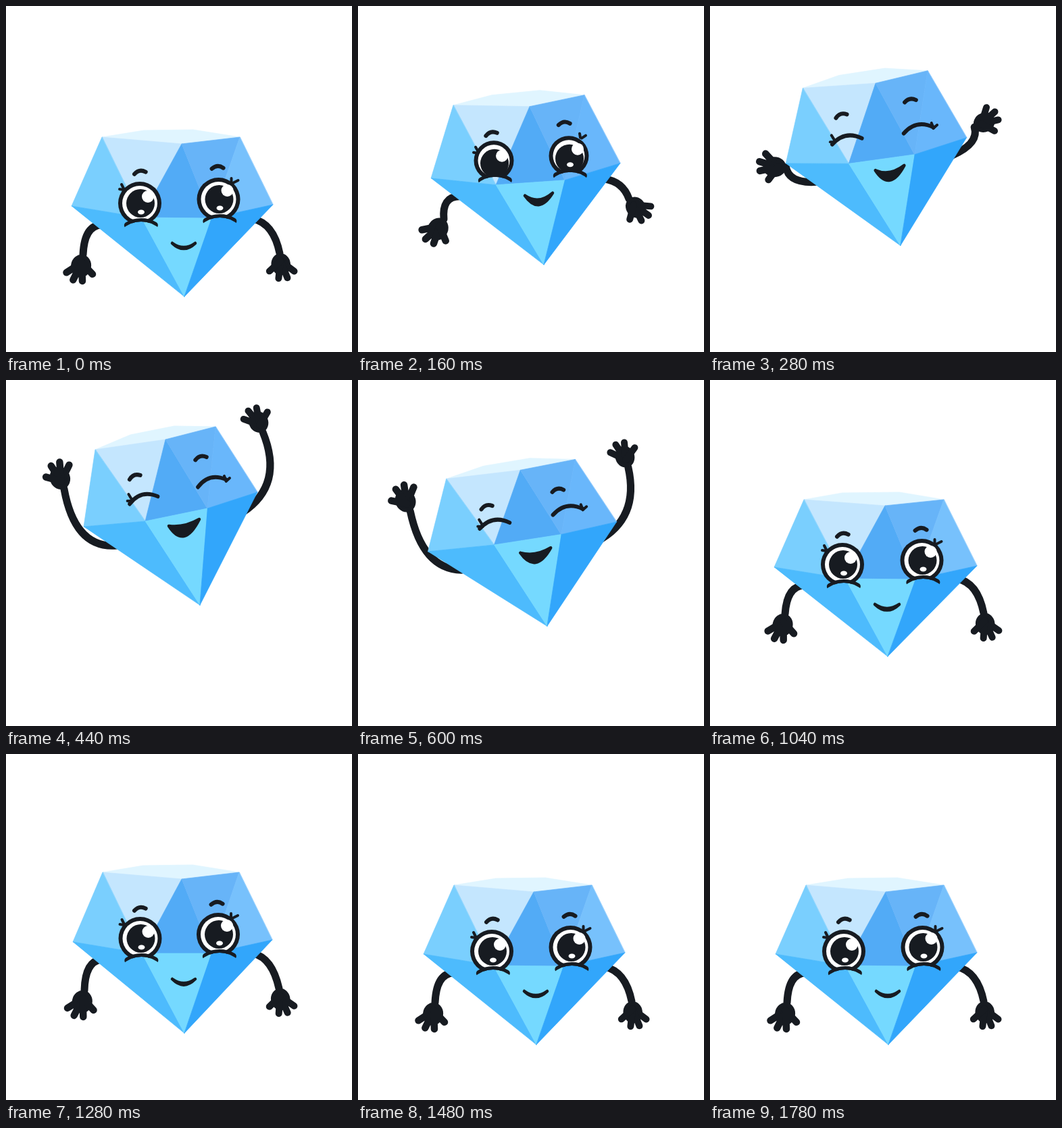
Write an HTML page with a canvas that moves like this. It is 512x512 px and loops after 1800 ms.

```html
<!DOCTYPE html>
<html lang="en">
<head>
<meta charset="utf-8">
<title>Happy gem</title>
<style>
html, body { margin: 0; width: 100%; height: 100%; overflow: hidden; background: #fff; }
canvas { display: block; }
</style>
</head>
<body>
<canvas id="stage" width="512" height="512"></canvas>
<script>
const ctx = document.getElementById('stage').getContext('2d');
const LOOP = 1800, INK = '#171b21', RAD = Math.PI / 180;
const keys = [];

// gem: ten corners; arms: shoulder, bend, wrist, hand angle;
// face: eyes, brows, mouth corners, lip depths, tilt, squint
function key(t, gem, left, right, face, lift = 0) {
  keys.push({ t, v: [...gem, ...left, ...right, ...face, lift] });
}

const rest = [
  [142,194, 204,184, 277,183, 346,194, 260,204, 97,296, 200,313, 304,314, 395,294, 264,430],
  [142,324, 116,324, 114,368, 100],
  [366,315, 396,322, 405,366, 84],
  [198,292, 314.5,286, 198,245, 313,238, 246,351, 280,351, 12,16, -4, 0]
];
const hop = [
  [143,175, 203,165, 276,164, 345,175, 260,185, 99,278, 201,295, 304,295, 394,275, 264,413],
  [142,304, 117,306, 116,350, 101],
  [366,295, 394,302, 404,347, 82],
  [198.5,273, 314,267, 198,228, 312,220, 246,333, 280,333, 12,17, -4, 0]
];

key(0, ...rest);
key(160,
  [141,147, 198,132, 269,125, 335,132, 254,149, 108,255, 204,265, 306,258, 388,233, 275,383],
  [150,282, 124,282, 127,316, 121],
  [364,256, 392,260, 401,286, 52],
  [201,229, 312,222, 197,188, 305,173, 247,281, 288,277, 16,31, -8, 1]);
key(440,
  [132,103, 184,81, 249,68, 310,69, 236,88, 115,217, 206,209, 298,190, 372,166, 287,333],
  [164,245, 102,250, 86,161, 249],
  [350,196, 412,155, 380,77, -113],
  [203,175, 304,150, 190,142, 288,114, 241,216, 286,206, 8,40, -15, 2]);
key(780,
  [130,197, 190,183, 266,178, 340,185, 250,196, 90,297, 196,299, 304,293, 395,278, 268,415],
  [140,324, 92,322, 73,271, 233],
  [360,302, 420,290, 423,244, -90],
  [199,274, 317,263, 190,243, 308,229, 240,325, 284,322, 12,27, -6, 2]);
key(900, rest[0],
  [142,322, 105,328, 93,350, 150],
  [366,313, 404,318, 414,345, 35],
  [197,292, 315,286, 196,246, 312,238, 244,351, 281,350, 12,20, -5, .6]);
key(1040,
  [139,177, 196,167, 280,166, 346,177, 259,186, 95,277, 200,294, 304,295, 395,275, 263,409],
  [140,304, 114,304, 111,346, 102],
  [366,294, 396,300, 405,345, 82],
  [196,273, 313.5,267, 196,228, 312,220, 244,332, 280,332, 12,17, -4, 0]);
key(1160, ...hop, -23);
key(1280, ...hop);
key(1420, ...rest);
key(LOOP, ...rest);

// Monotone slopes: smooth passage without overshoot
const rate = (i, c) => (keys[i + 1].v[c] - keys[i].v[c]) / (keys[i + 1].t - keys[i].t);
keys.forEach((k, i) => {
  k.m = k.v.map((_, c) => {
    if (!i || i === keys.length - 1) return 0;
    const a = rate(i - 1, c), b = rate(i, c);
    return a * b > 0 ? 2 * a * b / (a + b) : 0;
  });
});

function poseAt(t) {
  const i = keys.findIndex(k => k.t > t) - 1;
  const a = keys[i], b = keys[i + 1], d = b.t - a.t, u = (t - a.t) / d;
  const w = u * u * (3 - 2 * u), p = u * (1 - u) * (1 - u) * d, q = u * u * (u - 1) * d;
  return a.v.map((x, c) => x + (b.v[c] - x) * w + a.m[c] * p + b.m[c] * q);
}

function curve(x0, y0, cx, cy, x1, y1, width) {
  ctx.lineWidth = width;
  ctx.beginPath();
  ctx.moveTo(x0, y0);
  ctx.quadraticCurveTo(cx, cy, x1, y1);
  ctx.stroke();
}

function line(x0, y0, x1, y1, width) {
  curve(x0, y0, x0, y0, x1, y1, width);
}

function oval(x, y, rx, ry, color) {
  ctx.fillStyle = color;
  ctx.beginPath();
  ctx.ellipse(x, y, rx, ry, 0, 0, 7);
  ctx.fill();
}

// Draws in a moved, turned and scaled frame
function at(x, y, angle, sx, sy, draw) {
  ctx.save();
  ctx.translate(x, y);
  ctx.rotate(angle * RAD);
  ctx.scale(sx, sy);
  draw();
  ctx.restore();
}

const fingers = [[33, 36], [11.5, 40], [-8.5, 39], [-36, 32]];

function arm([x0, y0, cx, cy, x1, y1, angle], size, side) {
  ctx.strokeStyle = INK;
  curve(x0, y0, cx, cy, x1, y1, 11);
  at(x1, y1, angle, size, size * side, () => {
    oval(17, 0, 17, 15, INK);
    for (const [a, len] of fingers)
      line(12, 0, len * Math.cos(a * RAD), len * Math.sin(a * RAD), 10.5);
  });
}

const facets = [
  ['ABCDE', '#e0f5ff'], ['AEG', '#c4e6fe'], ['AFG', '#7acffe'],
  ['EGH', '#52abf6'], ['EDH', '#67b4f8'], ['DHI', '#77c1fc'],
  ['FGJ', '#4dbbfd'], ['GHJ', '#75d9ff'], ['HIJ', '#32a6fb']
];

function gem(p, squint) {
  ctx.lineWidth = .7;
  for (const [corners, color] of facets) {
    const happy = corners === 'DHI' && squint > 1;
    ctx.fillStyle = ctx.strokeStyle = happy ? '#69b7fb' : color;
    ctx.beginPath();
    for (const c of corners) {
      const i = 2 * (c.charCodeAt(0) - 65);
      ctx.lineTo(p[i], p[i + 1]);
    }
    ctx.closePath();
    ctx.fill();
    ctx.stroke();
  }
}

function openEye(x, y, s, isLeft) {
  const r = 32 - 2.5 * s, cheek = 67 - 3 * s;
  ctx.save();
  ctx.translate(x, y);
  ctx.beginPath();
  ctx.rect(-50, -50, 100, 150);
  ctx.arc(2, cheek, 40, 0, 7);
  ctx.clip('evenodd');
  oval(0, 0, r, r, INK);
  oval(0, 0, r - 6, r - 6, '#fff');
  oval(1, 4 * s, 21, 21, INK);
  oval(isLeft ? 12 : 13, (isLeft ? -10 : -13) + 3 * s, 9, 9, '#fff');
  oval(2, 13, 5, isLeft ? 3.5 * Math.max(0, 1 - s) : 3.5, '#fff');
  ctx.lineWidth = 10;
  ctx.beginPath();
  ctx.arc(2, cheek, 40, -2.1, -1.05);
  ctx.stroke();
  ctx.restore();
  if (isLeft) {
    line(x - 30, y - 21 + 9 * s, x - 24, y - 20 + 9 * s, 4);
    line(x - 27, y - 28 + 8 * s, x - 23, y - 20 + 7 * s, 4);
  } else {
    line(x + 19 - 3 * s, y - 31 - 2 * s, x + 19 - 2 * s, y - 25 - 2 * s, 4);
    line(x + 29 - 4 * s, y - 28 - 2 * s, x + 21 - 2 * s, y - 24 - 2 * s, 4);
  }
}

function closedEye(x, y, tilt, isLeft) {
  const k = 1 + (tilt + 6) / 90;
  at(x, y, tilt, k, 1, () => curve(-24, 3, 0, -14, 24, 3, 6));
  if (isLeft) {
    line(x - 24 * k, y - 6, x - 18 * k, y + 3, 4);
    line(x - 26 * k, y + 4, x - 18 * k, y + 4, 4);
  } else {
    line(x + 21 * k, y - 8, x + 24 * k, y - 1, 4);
    line(x + 30 * k, y - 5, x + 24 * k, y, 4);
  }
}

function face([lx, ly, rx, ry, blx, bly, brx, bry, x0, y0, x1, y1, top, low, tilt, squint]) {
  ctx.strokeStyle = INK;
  for (const [x, y, isLeft] of [[lx, ly, true], [rx, ry, false]]) {
    if (squint > 1.35) closedEye(x, y, tilt, isLeft);
    else openEye(x, y, squint, isLeft);
  }
  const brow = () => curve(-8.5, 2.5, 0, -4.5, 8.5, 2, 6);
  at(blx, bly, tilt - 5, 1, 1, brow);
  at(brx, bry, tilt + 2, 1, 1, brow);

  const mx = (x0 + x1) / 2, my = (y0 + y1) / 2;
  ctx.fillStyle = INK;
  ctx.lineWidth = 4.5;
  ctx.beginPath();
  ctx.moveTo(x0, y0);
  ctx.quadraticCurveTo(mx, my + top, x1, y1);
  ctx.quadraticCurveTo(mx, my + low, x0, y0);
  ctx.fill();
  ctx.stroke();
}

function frame() {
  const p = poseAt(performance.now() % LOOP);
  ctx.fillStyle = '#fff';
  ctx.fillRect(0, 0, 512, 512);
  ctx.lineCap = ctx.lineJoin = 'round';
  ctx.save();
  ctx.translate(0, p[50]);
  arm(p.slice(20, 27), 1, 1);
  arm(p.slice(27, 34), .95, -1);
  gem(p, p[49]);
  face(p.slice(34, 50));
  ctx.restore();
  requestAnimationFrame(frame);
}
frame();
</script>
</body>
</html>
```
